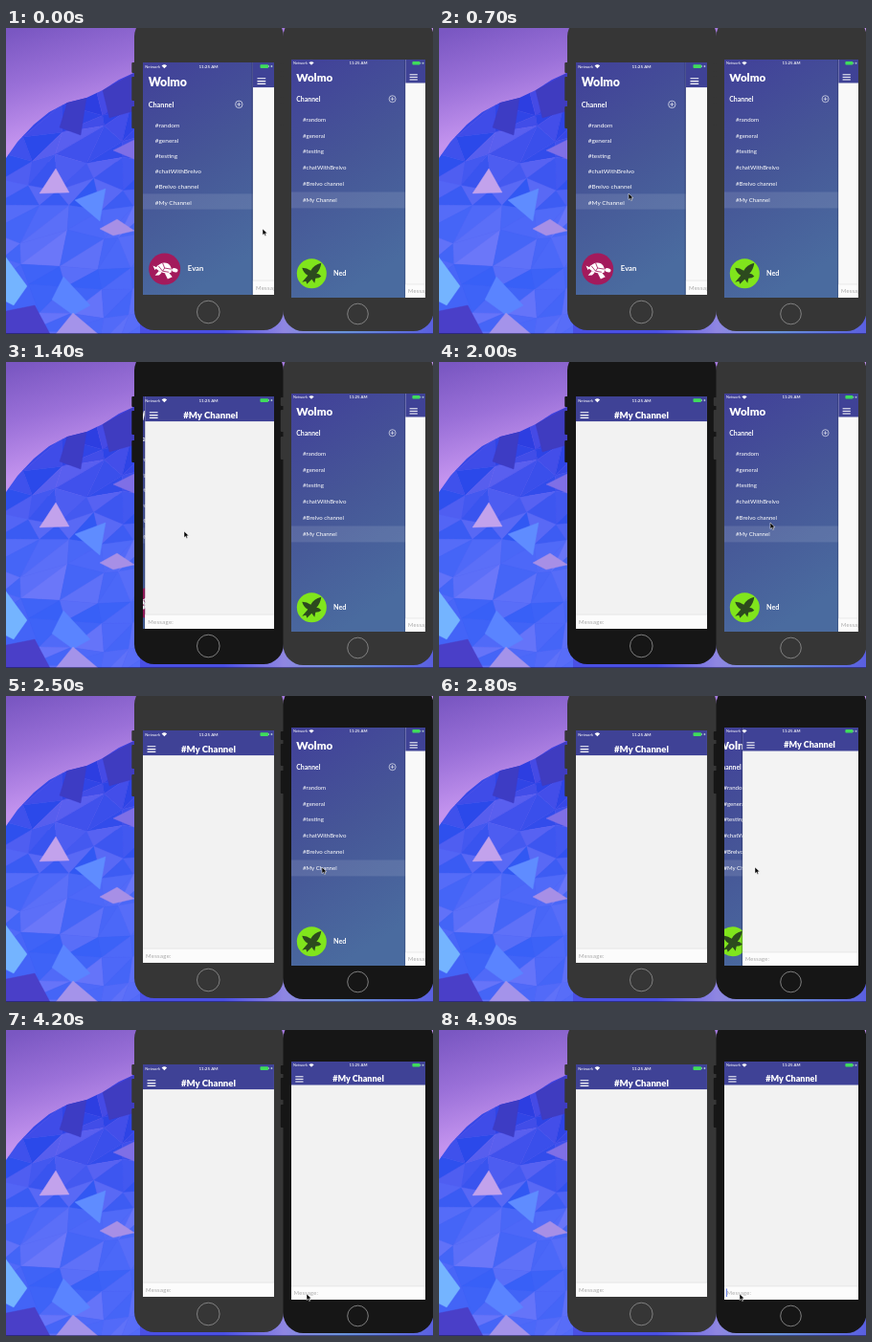
An HTML page that plays this animation: 446x320 px, repeating every 5 s.

```html
<!DOCTYPE html>
<html lang="en">
<head>
<meta charset="utf-8">
<title>Channel switch on two phones</title>
<style>
  html, body { margin: 0; width: 100%; height: 100%; overflow: hidden; background: #4a55ee; }
  #stage { display: block; width: 446px; height: 320px; }
  text { font-family: Lato, sans-serif; fill: #fff; }
  .status { font: 600 4.3px Inter, sans-serif; }
  .bold { font-weight: 900; }
</style>
</head>
<body>
<svg id="stage" viewBox="0 0 446 320">
  <defs>
    <linearGradient id="sky" gradientUnits="userSpaceOnUse" x1="20" y1="0" x2="50" y2="110">
      <stop offset="0" stop-color="#7a57c2"/>
      <stop offset=".5" stop-color="#9a70d8"/>
      <stop offset="1" stop-color="#c393ee"/>
    </linearGradient>
    <linearGradient id="floor">
      <stop offset=".3" stop-color="#4a50e4"/>
      <stop offset=".5" stop-color="#8f86e2"/>
      <stop offset=".7" stop-color="#6a94d8"/>
      <stop offset="1" stop-color="#5a5fe0"/>
    </linearGradient>
    <linearGradient id="menu" x1="0" y1="0" x2=".35" y2="1">
      <stop offset="0" stop-color="#414099"/>
      <stop offset=".5" stop-color="#465697"/>
      <stop offset="1" stop-color="#4a6b9f"/>
    </linearGradient>
    <linearGradient id="shade">
      <stop offset="0" stop-color="#111840" stop-opacity="0"/>
      <stop offset="1" stop-color="#111840" stop-opacity=".4"/>
    </linearGradient>
    <clipPath id="ridge">
      <path d="M0 136L12 119 29 101 45 88 64 78 84 73 101 65 118 54 140 44V320H0z"/>
    </clipPath>
  </defs>
  <rect width="446" height="140" fill="url(#sky)"/>
  <rect x="134" y="290" width="312" height="30" fill="url(#floor)"/>
  <g id="hills" clip-path="url(#ridge)"></g>
  <rect y="319" width="446" height="1" fill="#1b1950" opacity=".6"/>
  <g id="phones"></g>
  <path id="cursor" d="M0 0V6.6L1.6 5.2 2.7 7.6 3.8 7.1 2.8 4.8H5z" fill="#000" stroke="#fff" stroke-width=".5"/>
</svg>
<script>
const $ = id => document.getElementById(id);
const noise = n => { const v = Math.sin(n * 127.1 + 11.7) * 43758.5; return v - Math.floor(v); };

// Faceted hillside: jittered grid of triangles plus a few large facets
function drawHills() {
  const facet = (pts, fill) => `<polygon points="${pts}" fill="${fill}" stroke="${fill}" stroke-width=".4"/>`;
  const point = (c, r) => [c * 34 - 20 + noise(c * 7 + r * 31) * 22, r * 27 + 20 + noise(c * 13 + r * 5) * 18];
  let out = '';
  for (let r = 0; r < 12; r++) for (let c = 0; c < 5; c++) {
    const [a, b, d, e] = [point(c, r), point(c + 1, r), point(c, r + 1), point(c + 1, r + 1)];
    const tone = k => {
      const n = noise(c * 3 + r * 17 + k), depth = Math.min(1, r / 6);
      return `hsl(${238 - depth * 6 + n * 8 - 5} ${72 + depth * 20}% ${48 + depth * 11 + n * 11}%)`;
    };
    out += facet([a, b, d], tone(0)) + facet([b, e, d], tone(50));
  }
  const large = [
    ['64,78 84,73 78,112 56,104', '#3d3cc4'],
    ['101,65 140,44 136,86 108,94', '#3f3cc0'],
    ['52,147 66,172 35,173', '#c2a2ec'],
    ['112,128 136,116 136,138', '#7f6fe6'],
    ['98,210 116,200 134,212 112,217', '#a78fe6'],
    ['0,240 22,270 8,290 0,286', '#74b4ff'],
    ['72,180 104,168 98,202', '#5f8cff'],
    ['60,260 88,290 70,300 48,284', '#5a84ff'],
    ['0,296 30,290 46,320 0,320', '#4a3fc8'],
    ['52,320 70,298 96,320', '#a493ea']
  ];
  $('hills').innerHTML = out + large.map(f => facet(...f)).join('');
}

const turtle = `
  <circle r="15.5" fill="#a31a5c"/>
  <g fill="#fff" transform="rotate(12)">
    <path d="M-9 1Q-5 -7 2 -6Q7 -4 7 2Q0 6 -9 1z"/>
    <ellipse cx="10" cy="-1" rx="3" ry="2"/>
    <path d="M4 2L9 6 5 9 1 4zM-5 3L-8 8 -4 7 -2 4zM-8 0L-12 -1 -9 3z"/>
  </g>
  <path d="M-6 -3L-2 2 4 3M-2 -6L0 -1 6 0M-2 2L0 -1" fill="none" stroke="#a31a5c" stroke-width=".8"/>`;
const eagle = `
  <circle r="15.5" fill="#80e51c"/>
  <path fill="#2c4a1e" d="M10 -11Q2 -9 -1 -3Q-5 -6 -10 -6Q-9 -1 -4 2L-10 9 -6 8 -5 11 0 6 3 10 4 5Q8 5 10 3Q8 0 5 0Q9 -4 10 -11z"/>`;

// k scales the interface; w and h are the screen size in interface units
const phones = [
  { x: 143, y: 36, k: 1.065, w: 128.6, h: 228.2, body: [134, 156, 316], home: [211.3, 297, 11.8],
    keys: [[36, 11], [51, 25], [82, 23]], row: 61.4, step: 15.2, name: 'Evan', icon: turtle, opens: 1181, from: 1000, to: 2400 },
  { x: 298, y: 33, k: 1, w: 140, h: 249, body: [289.5, 157, 317], home: [367.5, 299, 10.8],
    keys: [[37, 9], [50, 23], [78, 24]], row: 62.4, step: 16.9, name: 'Ned', icon: eagle, opens: 2663, from: 2400, to: 5000 }
];
const channels = ['random', 'general', 'testing', 'chatWithBrelvo', 'Brelvo channel', 'My Channel'];

const text = (x, y, size, str, extra = '') => `<text x="${x}" y="${y}" font-size="${size}" ${extra}>${str}</text>`;

function drawPhone(p) {
  const { w, h, row, step } = p, drawer = w - 20.7, [bx, bw, bottom] = p.body, [cx, cy, r] = p.home;
  const rows = channels.map((c, i) => text(12, row + i * step + 2.2, 6.1, '#' + c)).join('');
  return `<g>
    <g class="case">
      ${p.keys.map(([y, len]) => `<rect x="${bx - 2.7}" y="${y}" width="4" height="${len}" rx="1"/>`).join('')}
      <rect x="${bx}" y="-12" width="${bw}" height="${bottom + 12}" rx="21"/>
    </g>
    <circle cx="${cx}" cy="${cy}" r="${r}" fill="none" stroke="#8a8a8a" stroke-width=".9"/>
    <svg x="${p.x}" y="${p.y}" width="${w * p.k}" height="${h * p.k}" viewBox="0 0 ${w} ${h}">
      <rect width="${w}" height="${h}" fill="url(#menu)"/>
      <g class="rear">
        ${text(5.3, 23.4, 11.6, 'Wolmo', 'class="bold"')}
        ${text(5.3, 43.8, 6.9, 'Channel', 'font-weight="700"')}
        <g fill="none" stroke="#fff" stroke-width=".6" transform="translate(${drawer - 13.7} 41.2)">
          <circle r="3.5"/><path d="M-2 0H2M0 -2V2"/>
        </g>
        <rect y="${row + 5 * step - 8.4}" width="${drawer + 15}" height="${step}" fill="#fff" opacity=".11"/>
        ${rows}
        <g transform="translate(21.3 ${h - 25.3})">${p.icon}</g>
        ${text(44, h - 23.2, 7.2, p.name, 'font-weight="700"')}
      </g>
      <g class="main">
        <rect x="-2" width="2" height="${h}" fill="url(#shade)"/>
        <rect width="${w}" height="${h}" fill="#f2f2f2"/>
        <rect class="glow" width="${w}" height="${h}" fill="#fff"/>
        <rect width="${w}" height="24.5" fill="#3f4296"/>
        <path d="M4.3 15.8H12.5M4.3 18.4H12.5M4.3 21H12.5" stroke="#fff" stroke-width="1"/>
        ${text(w / 2, 21.3, 9, '#My Channel', 'class="bold" text-anchor="middle"')}
        <rect y="${h - 14}" width="${w}" height="14" fill="#fcfcfc"/>
        <path d="M0 ${h - 14}H${w}" stroke="#d5d5d5" stroke-width=".5"/>
        ${text(2.8, h - 5, 5.6, 'Message:', 'style="fill:#a6a6a6" letter-spacing=".3"')}
        <rect class="caret" x="2.2" y="${h - 11.5}" width=".8" height="8.5" fill="#4a68e0"/>
      </g>
      <g class="status">
        <text x="2" y="5.3" font-size="3.9" font-weight="400">Network</text>
        <path d="M18.4 3.2Q21 1.2 23.6 3.2L21 5.8z" fill="#fff"/>
        <text x="${w / 2}" y="5.3" text-anchor="middle">11:25 AM</text>
        <rect x="${w - 13.6}" y="2" width="8" height="3.6" rx=".8" fill="#3fdc5c"/>
        <path d="M${w - 5.1} 3V4.6M${w - 3.4} 3.8H${w - 1.4}M${w - 2.4} 2.8V4.8" stroke="#cfeedd" stroke-width=".6"/>
      </g>
    </svg>
  </g>`;
}

drawHills();
$('phones').innerHTML = phones.map(drawPhone).join('');
phones.forEach((p, i) => {
  const root = $('phones').children[i];
  for (const part of ['case', 'rear', 'main', 'glow', 'caret']) p[part] = root.querySelector('.' + part);
});

// Pointer stops: time, x, y
const stops = [[0, 268, 210], [700, 198, 173], [1100, 186, 177], [1400, 186, 177], [2000, 346, 168],
  [2500, 330, 179], [2800, 330, 179], [3600, 319, 280], [4200, 314, 276], [5000, 314, 276]];

function pointer(t) {
  const i = stops.findIndex(s => s[0] > t), [a, ax, ay] = stops[i - 1], [b, bx, by] = stops[i];
  const u = (t - a) / (b - a), e = u * u * (3 - 2 * u);
  return [ax + (bx - ax) * e, ay + (by - ay) * e];
}

function draw(now) {
  const t = Math.floor(now % 5000 / 100) * 100;
  phones.forEach((p, i) => {
    const u = Math.min(1, Math.max(0, (t - p.opens) / 300)), open = (1 - u) ** 3;
    p.case.setAttribute('fill', t >= p.from && t < p.to ? '#161616' : '#363636');
    p.main.setAttribute('transform', `translate(${open * (p.w - 20.7)} 0)`);
    p.rear.setAttribute('transform', `translate(${(open - 1) * 15} 0)`);
    p.glow.setAttribute('opacity', open * .6);
    p.caret.setAttribute('opacity', i === 1 && t >= 4300 ? 1 : 0);
  });
  $('cursor').setAttribute('transform', `translate(${pointer(t)})`);
  requestAnimationFrame(draw);
}
draw(0);
</script>
</body>
</html>
```
